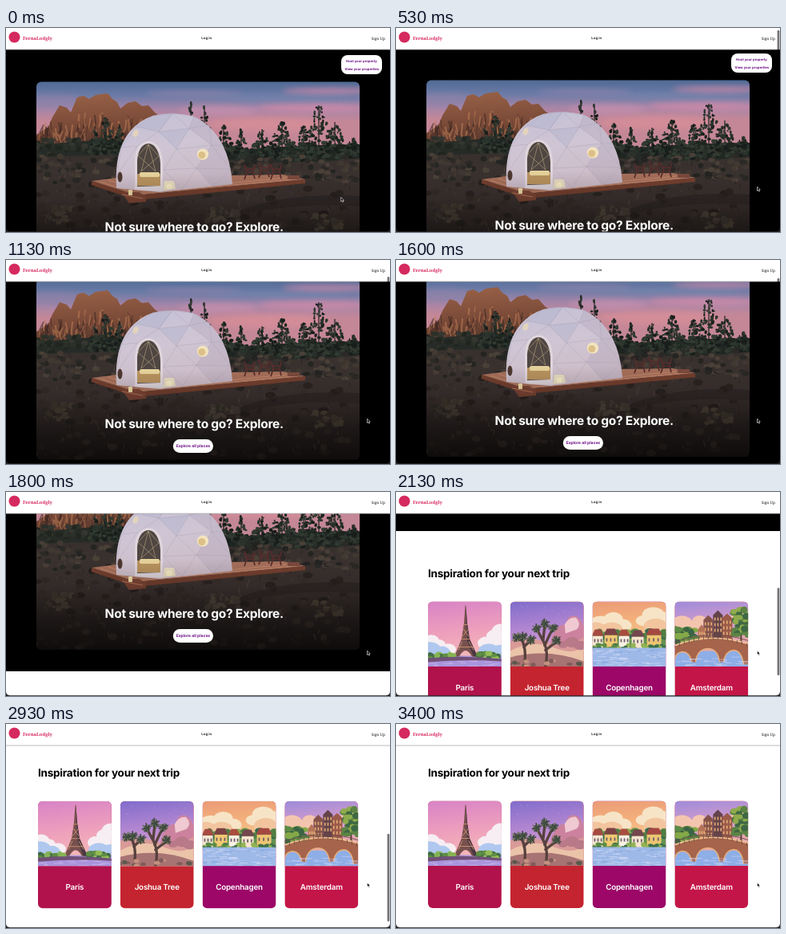
Write an HTML page that moves like this. It is 480 by 256 pixels and loops after 3540 ms.

```html
<!DOCTYPE html>
<html lang="en">
<head>
<meta charset="utf-8">
<title>Stay finder</title>
<style>
html, body { margin: 0; width: 480px; height: 256px; overflow: hidden; background: #fff; }
svg { display: block; }
text { font-family: Inter, "Open Sans", sans-serif; text-rendering: geometricPrecision; }
.serif { font-family: "Noto Serif", serif; }
.mid { text-anchor: middle; }
.bold { font-weight: 700; }
.semi { font-weight: 600; letter-spacing: -.02em; }
.head { font-weight: 700; letter-spacing: -.017em; }
</style>
</head>
<body>
<svg width="480" height="256" viewBox="0 0 480 256">
  <defs>
    <linearGradient id="sky" x2="0" y2="1">
      <stop offset="0" stop-color="#4f6a95"/><stop offset=".18" stop-color="#6b7ba6"/>
      <stop offset=".34" stop-color="#a585a8"/><stop offset=".5" stop-color="#c48797"/>
    </linearGradient>
    <linearGradient id="soil" x2="0" y2="1">
      <stop offset="0" stop-color="#37302d"/><stop offset=".4" stop-color="#3d3331"/>
      <stop offset="1" stop-color="#1f1a19"/>
    </linearGradient>
    <linearGradient id="rock" x2=".1" y2="1">
      <stop offset="0" stop-color="#9a6247"/><stop offset=".5" stop-color="#7a4a38"/><stop offset="1" stop-color="#3a2823"/>
    </linearGradient>
    <linearGradient id="shell" x2=".3" y2="1">
      <stop offset="0" stop-color="#c3c0d6"/><stop offset=".5" stop-color="#cfc5d4"/>
      <stop offset="1" stop-color="#cdbcc7"/>
    </linearGradient>
    <linearGradient id="dusk" x2="0" y2="1">
      <stop offset=".5" stop-opacity="0"/><stop offset="1" stop-opacity=".55"/>
    </linearGradient>
    <filter id="soft" x="-20%" y="-60%" width="140%" height="220%"><feGaussianBlur stdDeviation="3.5"/></filter>
    <clipPath id="frame"><rect x="38" y="67.5" width="404" height="227.5" rx="6"/></clipPath>
    <clipPath id="card"><rect width="91.8" height="134.5" rx="6"/></clipPath>
    <clipPath id="scene"><rect width="92" height="81.5"/></clipPath>
  </defs>
  <rect width="480" height="256" fill="#fff"/>
  <g id="page"></g>
  <g id="header">
    <rect width="480" height="27" fill="#fff"/>
    <rect y="26.6" width="480" height=".8" fill="#aaa"/>
    <circle cx="10.5" cy="11.5" r="7" fill="#d52a5f"/>
    <text class="serif bold" x="21" y="14.6" font-size="5.8" fill="#d52a5f">FernaLodgly</text>
    <text class="mid" x="250.7" y="14.4" font-size="4.4" font-weight="600" fill="#111">Log in</text>
    <text class="serif" x="456.8" y="14.8" font-size="4.7" font-weight="500" fill="#111">Sign Up</text>
  </g>
  <rect id="thumb" x="476.6" width="2.8" height="110" rx="1.4" opacity="0"/>
  <path d="M0 250V256H480V250Q480 255.2 475 255.2H5Q0 255.2 0 250Z" fill="#222"/>
  <path id="cursor" d="M0 0V5.2L1.2 4.1 2.1 6 3 5.6 2.2 3.8H3.8Z" stroke="#fff" stroke-width=".6"/>
</svg>
<script>
const $ = id => document.getElementById(id);

let seed = 7;
const rnd = (a = 0, b = 1) => {
  seed = (seed * 16807) % 2147483647;
  return a + (b - a) * seed / 2147483647;
};
const many = (n, make) => Array.from({ length: n }, (_, i) => make(i)).join('');
const path = (d, fill, more = '') => `<path d="${d}" fill="${fill}" ${more}/>`;
const line = (d, color, w, more = '') => path(d, 'none', `stroke="${color}" stroke-width="${w}" ${more}`);
const oval = (x, y, rx, ry, fill, more = '') =>
  `<ellipse cx="${x}" cy="${y}" rx="${rx}" ry="${ry}" fill="${fill}" ${more}/>`;
const rect = (x, y, w, h, fill, r = 0) =>
  `<rect x="${x}" y="${y}" width="${w}" height="${h}" rx="${r}" fill="${fill}"/>`;
const text = (x, y, size, cls, fill, str) =>
  `<text x="${x}" y="${y}" font-size="${size}" class="${cls}" fill="${fill}">${str}</text>`;
const blobs = (n, x0, x1, y0, y1, r, colors) => many(n, i =>
  oval(rnd(x0, x1), rnd(y0, y1), r * rnd(.7, 1.3), r * rnd(.5, .9), colors[i % colors.length]));

// Ragged tree: leaf clumps spread wider toward the base
function tree(x, top, base, w) {
  const leaves = ['#1f2722', '#2a342d', '#171d1b', '#323b31'];
  return line(`M${x} ${top}V${base}`, '#1b211f', 1.2) + many(Math.round(w * 5), i => {
    const t = rnd() ** .7;
    return oval(x + rnd(-w, w) * Math.min(1, .1 + 1.2 * t), top + t * (base - top),
      rnd(1.5, 4) * (.4 + .6 * t), rnd(1, 2.6), leaves[i % 4]);
  });
}

function dome() {
  const shell = 'M138 201Q136 166 146 144Q158 119 184 110Q208 104 235 111Q258 122 271 147Q281 167 283 196L192 206Z';
  const seams = 'M208 107L184 110L163 124L191 130ZM208 107L191 130L229 126ZM208 107L235 111L229 126L254 121' +
    'M163 124L144 150L164 148L191 130L213 152L229 126L257 147L254 121M257 147L271 147' +
    'M144 150L139 184L164 148M213 152L257 147L238 176L213 152L197 178L238 176L281 177L257 147' +
    'M197 178L220 203L238 176L258 199L281 177';
  return path(shell, 'url(#shell)') +
    path('M235 111Q276 130 283 196L258 199L238 176L257 147L229 126Z', '#a596b0', 'opacity=".25"') +
    path('M208 107L184 110L163 124L191 130ZM191 130L213 152L229 126Z', '#a9abc8', 'opacity=".35"') +
    line(seams, '#a59caf', .6, 'opacity=".6"') +
    path('M161 203V165Q163 142 179 142Q194 144 196 168V205Z', '#dfd5dc') +
    path('M164 199V166Q166 145 179 145Q191 147 193 170V198Z', '#4f4642') +
    path('M164 183H193V198H164Z', '#b9935f') + rect(167, 181, 25, 6, '#e6d29b', 2) +
    line('M165 160L178 146L191 161M169 180L178 146L187 180M165 160L187 180M191 161L169 180', '#b9a57d', .6) +
    oval(246, 158.5, 7.2, 7, '#f3e4be') + oval(244.8, 159.5, 4.5, 4.5, '#dcbf88') +
    oval(142.5, 187, 3, 6.5, '#4d3830') + oval(162, 132, 3.4, 4.6, '#e2d3bd', 'transform="rotate(25 162 132)"');
}

function chair(x, y) {
  return line(`M${x} ${y}L${x + 3} ${y + 10}H${x + 11}L${x + 13} ${y + 1}M${x + 3} ${y + 10}L${x} ${y + 19}` +
    `M${x + 11} ${y + 10}L${x + 13} ${y + 18}M${x + 1} ${y + 6}H${x + 12}`, '#572c2b', 1.7);
}

function photo() {
  const cloud = (x, y, rx, ry, c) => oval(x, y, rx, ry, c, 'filter="url(#soft)" opacity=".7"');
  const ridge = 'M38 168V134L53 124L58 112L67 97L76 100L81 106L89 87L97 85L104 89L112 84L127 82L133 89' +
    'L139 93L143 101L152 94L162 92L170 98L178 97L186 106L194 112V168Z';
  return rect(38, 67, 404, 100, 'url(#sky)') +
    cloud(340, 88, 90, 4, '#7384ac') + cloud(385, 100, 70, 5, '#d98ba8') +
    cloud(265, 104, 50, 6, '#c890ae') + cloud(405, 79, 60, 4, '#d98aa9') + cloud(330, 121, 75, 9, '#d98f99') +
    cloud(60, 92, 40, 8, '#8f82a8') + cloud(235, 82, 60, 3, '#9a86ad') +
    path(ridge, 'url(#rock)') +
    many(90, () => {
      const x = rnd(42, 180), y = rnd(98 + Math.abs(x - 115) * .3, 140);
      return line(`M${x} ${y}l${rnd(-3, 3)} ${rnd(4, 13)}l${rnd(-3, 3)} 5`, rnd() < .6 ? '#38241f' : '#bd7c55', rnd(.8, 2.4), 'opacity=".55"');
    }) +
    path('M38 148Q80 142 132 140L200 150Q250 148 300 152Q370 146 442 146V185H38Z', '#262b27') +
    blobs(60, 38, 140, 140, 160, 4, ['#20261f', '#2c3129', '#353630']) +
    blobs(70, 272, 442, 146, 164, 4, ['#1e241f', '#2b322b', '#333630']) +
    tree(125, 112, 158, 13) + tree(142, 122, 160, 8) + tree(111, 124, 158, 7) +
    tree(231, 94, 150, 9) + tree(248, 97, 155, 12) + tree(272, 121, 162, 13) + tree(294, 127, 160, 8) +
    tree(320, 127, 164, 14) + tree(345, 117, 164, 19) + tree(372, 122, 166, 12) +
    tree(391, 97, 168, 22) + tree(411, 118, 166, 16) + tree(433, 138, 166, 13) +
    path('M38 162Q150 157 260 165T442 163V296H38Z', 'url(#soil)') +
    blobs(190, 38, 442, 161, 195, 4, ['#2b2926', '#403831', '#4a4038', '#242422']) +
    blobs(150, 38, 442, 195, 292, 5, ['#2c2522', '#3a302b', '#28221f', '#352c28']) +
    many(190, () => line(`M${rnd(38, 442)} ${rnd(165, 290)}l${rnd(-3, 3)} ${rnd(-6, -2)}`,
      rnd() < .5 ? '#5d5047' : '#1d1a18', .8, 'opacity=".7"')) +
    path('M282 234Q340 205 442 211V224Q340 217 270 243Z', '#2a2423', 'opacity=".6"') +
    path('M107 192L145 187L346 184L374 190L163 210Z', '#a66f5a') +
    path('M107 192L163 210L374 190V195L163 216L107 197Z', '#75402f') +
    line('M118 193L164 208L365 189.5M128 191L172 205L350 188', '#cf9072', .7) +
    path('M144 206H166L175 211V218L154 220Z', '#7e4636') + line('M145 209L171 214', '#b87659', 1.2) +
    dome() + chair(298, 171) + chair(316, 169) + chair(331, 171) +
    rect(352, 185, 15, 5, '#7c4a3d', 1) +
    rect(153, 203, 5, 7, '#f4dfab', 1) + path('M196 204L198 192H210L212 202Z', '#e8dcc0') + oval(204, 199, 4, 3.5, '#f7ecc4') +
    blobs(30, 250, 290, 226, 242, 4, ['#453d35', '#38322b', '#50463c']) +
    blobs(30, 382, 420, 235, 254, 4, ['#413930', '#332d27', '#4c4338']) +
    blobs(30, 48, 88, 224, 246, 4, ['#3f382f', '#312b26', '#494036']) +
    rect(38, 67, 404, 229, 'url(#dusk)');
}

const fade = (id, ...colors) => `<linearGradient id="${id}" x2=".15" y2="1">` +
  colors.map((c, i) => `<stop offset="${i / (colors.length - 1)}" stop-color="${c}"/>`).join('') + '</linearGradient>';
const puffs = (list, color) => list.map(([x, y, r]) => oval(x, y, r, r * .72, color)).join('');
const ripples = (y0, color, n = 24) => many(n, () =>
  line(`M${rnd(0, 85)} ${rnd(y0, 81)}h${rnd(4, 13)}`, color, .7, 'opacity=".7"'));

function paris() {
  return fade('p', '#d783c6', '#ed9fbc', '#f7bdb7') + rect(0, 0, 92, 82, 'url(#p)') +
    puffs([[4, 49, 10], [13, 54, 9], [84, 43, 11], [91, 36, 11], [73, 52, 11], [25, 60, 10], [88, 55, 12]], '#f6eef3') +
    puffs([[3, 60, 13], [17, 64, 11], [76, 62, 13], [90, 63, 12]], '#b0c8ef') +
    rect(0, 68, 92, 14, '#a995dc') + ripples(72, '#d9c0ee') +
    path('M46.5 5L47.5 5L49 27L52 47L62 69H55Q47 54 39 69H33L42 47L45 27Z', '#76504e') +
    path('M47.3 6L49 27L52 47L62 69H57L49 49Z', '#4a3842') +
    line('M41 47H53M44 29H50M38 57H57M43 44L51 34M51 44L44 34M38 61L43 50M57 61L51 50', '#c58b6e', 1) +
    blobs(22, 0, 31, 66, 72, 4, ['#5f8d44', '#85b354', '#426d48']) +
    blobs(20, 61, 92, 65, 71, 4, ['#5f8d44', '#94bb56', '#426d48']) +
    path('M0 71Q45 67 92 72V75Q48 72 0 76Z', '#715076');
}

function joshua() {
  const tuft = ([x, y]) => many(15, i => {
    const a = i * Math.PI / 7.5, r = rnd(4, 7);
    return line(`M${x} ${y}l${r * Math.cos(a)} ${r * Math.sin(a)}`, i % 3 ? '#39443d' : '#677350', 1.5);
  });
  return fade('j', '#806ccb', '#b889d2', '#f0b1bf') + rect(0, 0, 92, 82, 'url(#j)') +
    many(20, () => oval(rnd(0, 92), rnd(1, 30), .35, .35, '#ead9f5')) +
    path('M52 45Q58 28 69 29Q72 16 81 18Q92 22 92 39V55H49Z', '#cc829e') +
    path('M68 29Q73 19 82 20Q90 28 83 35L69 40Z', '#f0c9d2') +
    path('M0 50Q22 42 44 51T92 45V82H0Z', '#d99a98') +
    path('M0 62Q27 47 55 58T92 53V82H0Z', '#ebc3a9') + path('M0 70Q46 58 92 75V82H0Z', '#a77373') +
    puffs([[77, 51, 9], [66, 54, 6], [87, 55, 8]], '#b87988') +
    line('M44 82Q48 63 42 51L34 36M43 55L50 40L55 33M44 61L57 51M41 49L43 31M18 76Q20 60 15 49L9 46M17 57L25 49', '#56413e', 3.3, 'stroke-linecap="round"') +
    [[33, 34], [43, 28], [54, 33], [58, 49], [8, 45], [16, 44], [26, 48]].map(tuft).join('') +
    blobs(13, 0, 92, 74, 81, 3, ['#805d5b', '#59594b', '#c4917f']);
}

function copenhagen() {
  const house = (x, y, w, wall, roof) => rect(x, y, w, 15, wall) +
    path(`M${x - 1} ${y}L${x + 3} ${y - 8}H${x + w - 3}L${x + w + 1} ${y}Z`, roof) +
    many(3, i => rect(x + 2 + i * w / 3.2, y + 4, 1.7, 4, '#665968'));
  return fade('c', '#eb9b77', '#f4b27c', '#f6d1a4') + rect(0, 0, 92, 60, 'url(#c)') +
    puffs([[10, 28, 14], [26, 22, 12], [38, 30, 11], [76, 17, 14], [88, 22, 13], [63, 24, 9]], '#f7e4c6') +
    puffs([[4, 36, 14], [24, 36, 14], [79, 32, 15]], '#f2c59f') +
    path('M0 43Q20 33 42 40T92 35V60H0Z', '#639250') +
    blobs(30, 0, 92, 37, 47, 5, ['#507e43', '#89a952', '#356a4e']) +
    house(0, 43, 13, '#f6e7d2', '#a64a42') + house(15, 42, 16, '#f1c873', '#7c4144') +
    house(33, 43, 13, '#faf1e4', '#a84e3f') + house(49, 44, 15, '#f6e4cf', '#74464e') + house(68, 42, 18, '#edc472', '#a54841') +
    blobs(30, 0, 92, 54, 59, 3, ['#5c8c46', '#91b353', '#3d704b']) +
    rect(0, 58, 92, 24, '#9eb9e8') + ripples(60, '#e5e5f6', 44) + ripples(60, '#769ed4', 18);
}

function amsterdam() {
  const house = (x, y, w, c) => path(`M${x} 54V${y + 6}L${x + w / 2} ${y}L${x + w} ${y + 6}V54Z`, c) +
    many(9, i => rect(x + 1.5 + i % 3 * w / 3.2, y + 9 + Math.floor(i / 3) * 7, 1.6, 4, '#e6ae77'));
  return fade('a', '#9e8bda', '#dea0c8', '#f3b18f') + rect(0, 0, 92, 82, 'url(#a)') +
    puffs([[9, 27, 13], [23, 31, 10], [31, 24, 9], [80, 18, 10]], '#f4c5ae') +
    house(36, 17, 12, '#85524b') + house(48, 11, 12, '#634249') + house(59, 15, 13, '#9b5b4a') + house(29, 29, 9, '#b57357') +
    blobs(40, 0, 27, 34, 53, 5, ['#5d8946', '#85a948', '#3b6444']) +
    line('M83 54V25M83 39L89 29M83 36L77 28', '#584437', 2) +
    blobs(42, 74, 92, 9, 42, 5, ['#5c8444', '#8fab4b', '#3e6744']) +
    rect(0, 62, 92, 20, '#8eaee7') +
    path('M0 56Q45 39 92 54V79H86Q84 62 74 61Q63 62 61 76H56Q54 59 41 59Q28 60 26 76H21Q19 63 9 63Q2 64 0 72Z', '#a5644b') +
    line('M0 55Q45 38 92 53', '#efbf8c', 1.8) + line('M0 51Q45 34 92 49', '#684946', .9) +
    many(16, i => line(`M${i * 6} ${54 - 11 * Math.sin(i * .2)}v4`, '#684946', .8)) +
    line('M26 76Q28 60 41 59Q54 59 56 76M61 76Q63 62 74 61Q84 62 86 79M0 72Q2 64 9 63Q19 63 21 76', '#e6ad7d', 1.5) +
    ripples(69, '#d9d8f4', 32);
}

const cards = [
  ['Paris', '#b1124b', paris], ['Joshua Tree', '#c4242f', joshua],
  ['Copenhagen', '#9c0768', copenhagen], ['Amsterdam', '#c31548', amsterdam]
];
const card = ([name, color, art], i) =>
  `<g transform="translate(${40 + i * 102.8} 410.5)" clip-path="url(#card)">${rect(0, 0, 92, 135, color)}` +
  `<g clip-path="url(#scene)">${art()}</g>${text(45.9, 111.2, 9.8, 'semi mid', '#fff', name)}</g>`;

$('page').innerHTML = rect(0, 0, 480, 322, '#000') +
  rect(419, 34, 51, 24, '#fff', 8) +
  text(444.5, 42.9, 4.2, 'bold mid', '#6c0f86', 'Host your property') +
  text(444.8, 52.6, 4.2, 'bold mid', '#6c0f86', 'View your properties') +
  `<g clip-path="url(#frame)">${photo()}</g>` +
  text(235.3, 254.6, 15.5, 'head mid', '#fff', 'Not sure where to go? Explore.') +
  rect(208.8, 269, 50.2, 17, '#fff', 8.5) +
  text(233.9, 279.3, 5, 'bold mid', '#6c0f86', 'Explore all places') +
  text(40, 380.2, 13.5, 'head', '#000', 'Inspiration for your next trip') +
  cards.map(card).join('');

// [step, scroll offset], 15 steps per second
const flick = [[7, 0], [8, 2], [9, 5], [10, 10], [11, 15], [13, 26], [15, 37], [17, 44], [23, 44], [24, 48],
  [25, 58], [26, 74], [27, 97], [28, 128], [29, 170], [30, 213], [31, 248], [32, 273]];
const END = 314, LOOP = 3540;

function scrollAt(k) {
  if (k >= 47) return END;
  if (k >= 32) return END - 41 * Math.exp((32 - k) / 2.32);
  const i = flick.findIndex(([s]) => s >= k);
  if (i < 1) return 0;
  const [a, b] = [flick[i - 1], flick[i]];
  return a[1] + (b[1] - a[1]) * (k - a[0]) / (b[0] - a[0]);
}

function draw(now) {
  const k = Math.min(51, Math.floor((now % LOOP + 4) * .015));
  const y = scrollAt(k);
  const move = 1 - (1 - Math.min(1, k / 5)) ** 2;
  $('page').setAttribute('transform', `translate(0 ${-y})`);
  $('cursor').setAttribute('transform', `translate(${418.7 + 32.8 * move} ${212.5 - 13.3 * move})`);
  $('thumb').setAttribute('y', 2 + .433 * y);
  $('thumb').setAttribute('opacity', k < 8 ? 0 : .55 * Math.max(0, Math.min(1, (51 - k) / 4)));
}

const start = performance.now();
function tick() {
  draw(performance.now() - start);
  requestAnimationFrame(tick);
}
tick();
</script>
</body>
</html>
```
